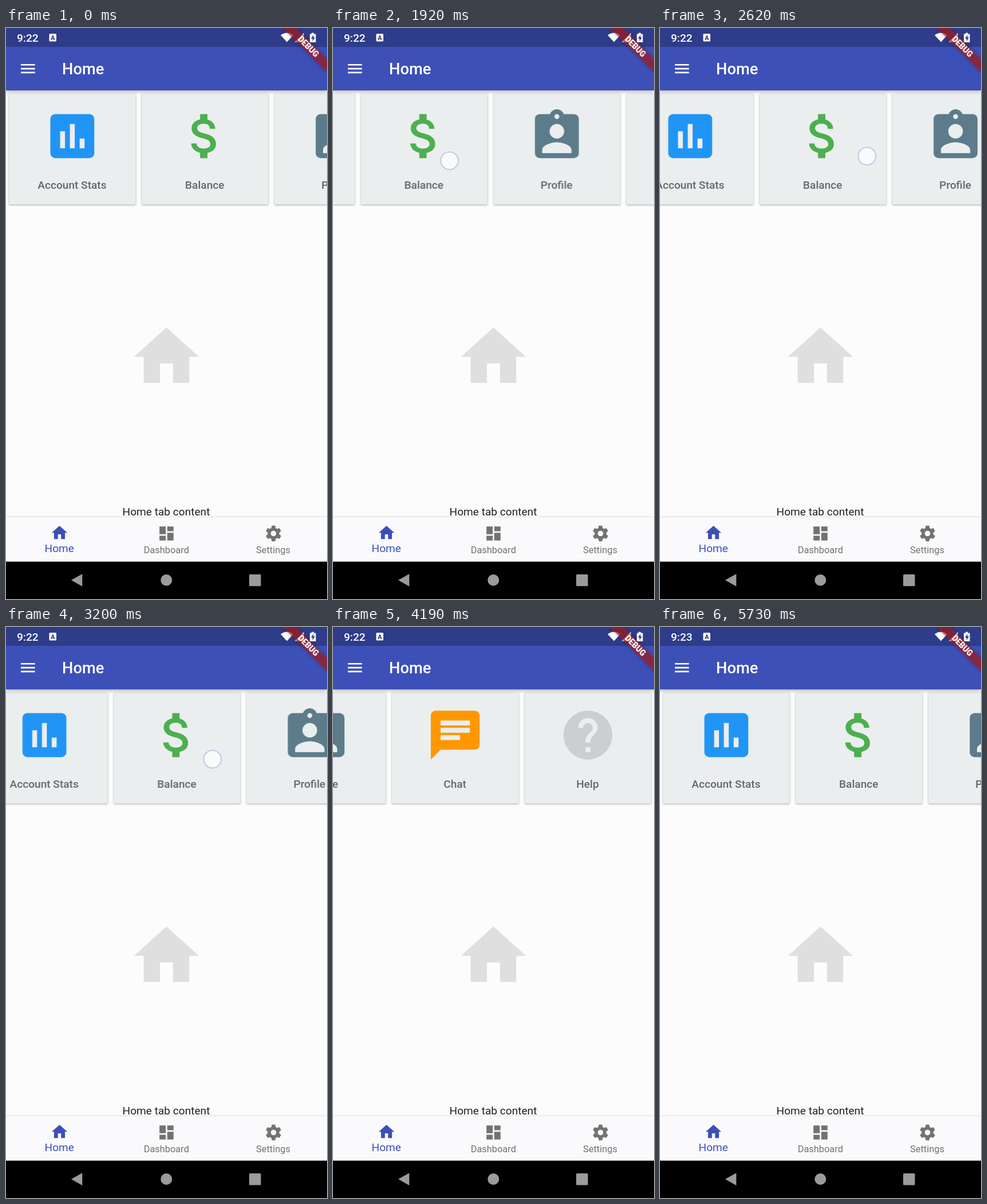
Write an HTML page that moves like this. It is 561x998 px and loops after 5.77 s.

```html
<!DOCTYPE html>
<html lang="en">
<head>
<meta charset="utf-8">
<title>Home</title>
<style>
  html, body { margin: 0; width: 100%; height: 100%; overflow: hidden; background: #fcfcfc; }
  svg { display: block; }
  #stage { width: 100vw; height: 100vh; }
  text { font-family: Roboto, Arial, sans-serif; font-size: 19.1px; }
  .mid { text-anchor: middle; }
  .bold { font-weight: 500; }
  .white { fill: #fff; }
  .card rect { fill: #ebeeee; filter: drop-shadow(0 1.6px 1.4px rgba(0,0,0,.34)); }
  .card text { fill: #646767; font-weight: 500; text-anchor: middle; }
  .bar { filter: drop-shadow(0 2px 3px rgba(0,0,0,.34)); }
  .tabs { filter: drop-shadow(0 -.5px .8px rgba(0,0,0,.12)); }
  .tab { fill: #727272; }
  .tab text { font-size: 16.4px; text-anchor: middle; }
  .tab.on { fill: #3c4fb8; }
  .tab.on text { font-size: 19.1px; }
  .ribbon { filter: drop-shadow(0 0 3px rgba(0,0,0,.45)); }

  #track, #finger, #dot, .clock { animation: 5770ms linear infinite; }
  #track { animation-name: scroll; }
  #finger { animation-name: drag; }
  #dot { animation-name: touch; animation-timing-function: step-end; }
  .clock { animation-name: tick; animation-timing-function: step-end; }
  .clock.next { animation-name: tock; }

  @keyframes scroll {
    0%, 28.42% { transform: translateX(0); animation-timing-function: ease-in; }
    33.28% { transform: translateX(-188px); animation-timing-function: ease-out; }
    35.53%, 38.99% { transform: translateX(-235px); animation-timing-function: ease-in; }
    45.41% { transform: translateX(-63.5px); }
    47.49% { transform: translateX(-15px); animation-timing-function: ease-out; }
    50.26%, 53.9% { transform: translateX(0); animation-timing-function: ease-in; }
    55.46% { transform: translateX(-47.5px); }
    57.71% { transform: translateX(-220px); animation-timing-function: cubic-bezier(.3,.5,.5,1); }
    65.86%, 80.42% { transform: translateX(-598px); animation-timing-function: ease-in; }
    84.06% { transform: translateX(-350px); animation-timing-function: cubic-bezier(.3,.5,.5,1); }
    92.72%, 100% { transform: translateX(0); }
  }
  @keyframes drag {
    0%, 27.04% { transform: translate(404px,225px); }
    28.42% { transform: translate(392px,226px); animation-timing-function: ease-in; }
    33.28% { transform: translate(204px,232px); animation-timing-function: ease-out; }
    35.53% { transform: translate(157px,232px); }
    37.95% { transform: translate(174px,226px); }
    38.99% { transform: translate(189.5px,226px); animation-timing-function: ease-in; }
    45.41% { transform: translate(361.3px,224px); }
    47.49% { transform: translate(409.5px,224px); }
    52.86% { transform: translate(424px,230px); }
    53.9% { transform: translate(409.5px,230px); animation-timing-function: ease-in; }
    55.46% { transform: translate(362px,231px); }
    57.71% { transform: translate(189.5px,233px); }
    79.2% { transform: translate(130px,228px); }
    80.42% { transform: translate(150px,228px); animation-timing-function: ease-in; }
    84.06%, 100% { transform: translate(398px,226px); }
  }
  @keyframes touch {
    0%, 36.05%, 47.66%, 57.89%, 84.23%, 100% { opacity: 0; }
    27.04%, 37.95%, 52.86%, 79.2% { opacity: 1; }
  }
  @keyframes tick { 0% { opacity: 1; } 93.59%, 100% { opacity: 0; } }
  @keyframes tock { 0% { opacity: 0; } 93.59%, 100% { opacity: 1; } }
</style>
</head>
<body>
<svg id="stage" viewBox="0 0 561 998" preserveAspectRatio="none">
  <defs>
    <symbol id="home" viewBox="0 0 24 24"><path d="M10 20v-6h4v6h5v-8h3L12 3 2 12h3v8z"/></symbol>
    <symbol id="stats" viewBox="0 0 24 24"><path d="M19 3H5c-1.1 0-2 .9-2 2v14c0 1.1.9 2 2 2h14c1.1 0 2-.9 2-2V5c0-1.1-.9-2-2-2zM9 17H7v-7h2v7zm4 0h-2V7h2v10zm4 0h-2v-4h2v4z"/></symbol>
    <symbol id="money" viewBox="0 0 24 24"><path d="M11.8 10.9c-2.27-.59-3-1.2-3-2.15 0-1.09 1.01-1.85 2.7-1.85 1.78 0 2.44.85 2.5 2.1h2.21c-.07-1.72-1.12-3.3-3.21-3.81V3h-3v2.16c-1.94.42-3.5 1.68-3.5 3.61 0 2.31 1.91 3.46 4.7 4.13 2.5.6 3 1.48 3 2.41 0 .69-.49 1.79-2.7 1.79-2.06 0-2.87-.92-2.98-2.1h-2.2c.12 2.19 1.76 3.42 3.68 3.83V21h3v-2.15c1.95-.37 3.5-1.5 3.5-3.55 0-2.84-2.43-3.81-4.7-4.4z"/></symbol>
    <symbol id="badge" viewBox="0 0 24 24"><path d="M19 3h-4.18C14.4 1.84 13.3 1 12 1s-2.4.84-2.82 2H5c-1.1 0-2 .9-2 2v14c0 1.1.9 2 2 2h14c1.1 0 2-.9 2-2V5c0-1.1-.9-2-2-2zm-7 0c.55 0 1 .45 1 1s-.45 1-1 1-1-.45-1-1 .45-1 1-1zm0 4c1.66 0 3 1.34 3 3s-1.34 3-3 3-3-1.34-3-3 1.34-3 3-3zm6 12H6v-1.4c0-2 4-3.1 6-3.1s6 1.1 6 3.1V19z"/></symbol>
    <symbol id="chat" viewBox="0 0 24 24"><path d="M20 2H4c-1.1 0-2 .9-2 2v18l4-4h14c1.1 0 2-.9 2-2V4c0-1.1-.9-2-2-2zM6 9h12v2H6V9zm8 5H6v-2h8v2zm4-6H6V6h12v2z"/></symbol>
    <symbol id="help" viewBox="0 0 24 24"><path d="M12 2C6.48 2 2 6.48 2 12s4.48 10 10 10 10-4.48 10-10S17.52 2 12 2zm1 17h-2v-2h2v2zm2.07-7.75l-.9.92C13.45 12.9 13 13.5 13 15h-2v-.5c0-1.1.45-2.1 1.17-2.83l1.24-1.26c.37-.36.59-.86.59-1.41 0-1.1-.9-2-2-2s-2 .9-2 2H8c0-2.21 1.79-4 4-4s4 1.79 4 4c0 .88-.36 1.68-.93 2.25z"/></symbol>
    <symbol id="dash" viewBox="0 0 24 24"><path d="M3 13h8V3H3zm0 8h8v-6H3zm10 0h8V11h-8zm0-18v6h8V3z"/></symbol>
    <path id="tooth" d="M9.7 2.5Q9.8 2 10.3 2h3.4q.5 0 .6.5L14.8 6H9.2z"/>
    <symbol id="gear" viewBox="0 0 24 24">
      <circle cx="12" cy="12" r="5.5" fill="none" stroke="#727272" stroke-width="4"/>
      <use href="#tooth"/>
      <use href="#tooth" transform="rotate(60 12 12)"/>
      <use href="#tooth" transform="rotate(120 12 12)"/>
      <use href="#tooth" transform="rotate(180 12 12)"/>
      <use href="#tooth" transform="rotate(240 12 12)"/>
      <use href="#tooth" transform="rotate(300 12 12)"/>
    </symbol>
  </defs>

  <rect width="561" height="998" fill="#fcfcfc"/>
  <use href="#home" x="212.2" y="506.5" width="136.5" height="136.5" fill="#dfdfdf"/>
  <text class="mid" x="280" y="852" fill="#212121">Home tab content</text>

  <g id="track"></g>

  <rect class="bar" width="561" height="109" fill="#3d50b7"/>
  <rect width="561" height="33" fill="#000" fill-opacity=".25"/>
  <path d="M26 62.9h24.6v2.7H26zm0 6.9h24.6v2.7H26zm0 6.8h24.6v2.7H26z" class="white"/>
  <text class="bold white" x="98" y="81" style="font-size:27.3px">Home</text>

  <text class="clock bold white" x="19" y="23.8">9:22</text>
  <text class="clock next bold white" x="19" y="23.8">9:23</text>
  <rect x="75.5" y="10" width="12.5" height="13.5" rx="1.5" class="white"/>
  <text class="mid" x="81.8" y="20.6" fill="#2f3d88" style="font-size:10.5px;font-weight:900">A</text>
  <path d="M480 12.5Q491 4.500 502 12.5L491 24.500z" class="white"/>
  <path d="M504.500 24.500L520.500 8.500V24.500z" class="white"/>
  <path d="M531 10.500h3v-2h4v2h3.500v14.500H531z" class="white"/>
  <path d="M537.300 12l-4.300 6.500h2.700v4.500l4.300-6.500h-2.700z" fill="#2f3d88"/>

  <g class="tabs"><rect y="855" width="561" height="78" fill="#fafafc"/></g>
  <g class="tab on">
    <use href="#home" x="77.100" y="865.900" width="32.800" height="32.800"/>
    <text x="93.300" y="916.300">Home</text>
  </g>
  <g class="tab">
    <use href="#dash" x="264.100" y="867.100" width="32.800" height="32.800"/>
    <text x="280.300" y="918">Dashboard</text>
  </g>
  <g class="tab">
    <use href="#gear" x="451.100" y="867.100" width="32.800" height="32.800"/>
    <text x="467" y="918">Settings</text>
  </g>

  <rect y="932.700" width="561" height="66" fill="#000"/>
  <g fill="#9b9b9b">
    <path d="M114 965L133.300 954.300V976z"/>
    <circle cx="280.300" cy="965" r="10"/>
    <rect x="425" y="955" width="20.500" height="20.500" rx="1.500"/>
  </g>

  <g transform="translate(561 0) rotate(45)">
    <g class="ribbon"><rect x="-58" y="38.200" width="116" height="16.400" fill="#b71c1c" fill-opacity=".63"/></g>
    <text class="mid white" x="0" y="51.300" style="font-size:13.900px;font-weight:900">DEBUG</text>
  </g>

  <g id="finger">
    <circle id="dot" r="15.300" fill="#fff" fill-opacity=".72" stroke="#a9b0e2" stroke-opacity=".75" stroke-width="1.800"/>
  </g>
</svg>
<script>
  const cards = [
    ['stats', 'Account Stats', '#2095f6'],
    ['money', 'Balance', '#4caf50'],
    ['badge', 'Profile', '#5d7c8b'],
    ['chat', 'Chat', '#ff9800'],
    ['help', 'Help', '#cbcfd0']
  ];
  document.getElementById('track').innerHTML = cards.map(([icon, label, color], i) => `
    <g class="card" transform="translate(${5.4 + i * 231.9} 114.5)">
      <rect width="221.200" height="194" rx="1.500"/>
      <use href="#${icon}" x="59.300" y="23.300" width="102.400" height="102.400" fill="${color}"/>
      <text x="110" y="166.500">${label}</text>
    </g>`).join('');
</script>
</body>
</html>
```
